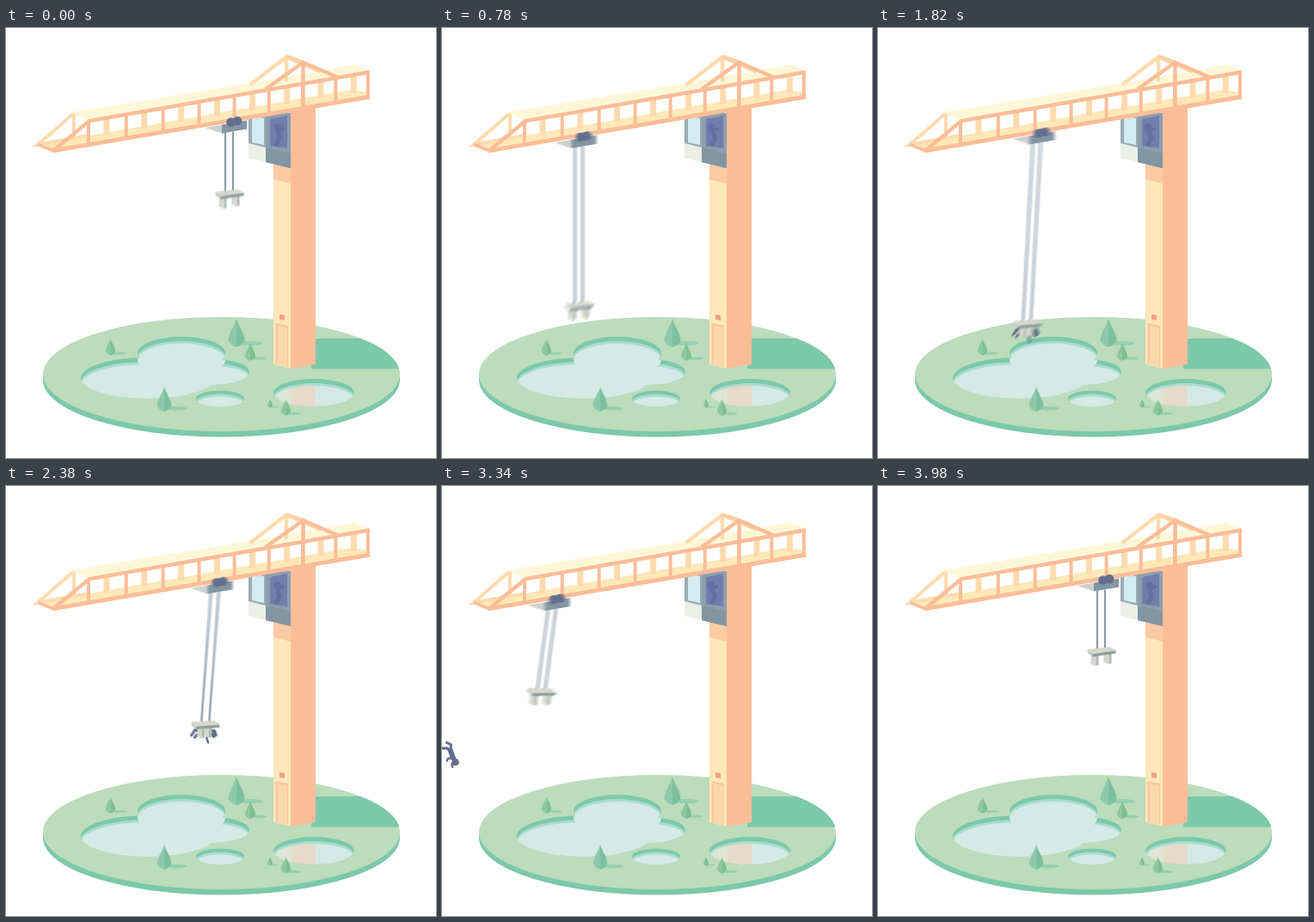
An HTML page with a canvas that plays this animation: 500x500 px, repeating every 4.68 s.

```html
<!DOCTYPE html>
<html lang="en">
<head>
<meta charset="utf-8">
<title>Crane</title>
<style>
html, body { margin: 0; width: 100%; height: 100%; overflow: hidden; background: #fff; }
canvas { display: block; width: 500px; height: 500px; }
</style>
</head>
<body>
<canvas id="stage" width="500" height="500"></canvas>
<script>
const LOOP = 4680, STEP = 40, START = 300, END = 3980;
const GRAB = 1240, RELEASE = 3080, SHUTTER = 20, SAMPLES = 6;
const ORANGE = '#fabd98', PEACH = '#fedbae', CREAM = '#fee8b9', TOP = '#fef7d7';
const GREEN = '#bcdcbb', TEAL = '#7cc8aa', WATER = '#d4eae5', SHORE = '#a9dccf';
const SLATE = '#8295a3', NAVY = '#63708d', STEEL = '#d6d8ce', SHADE = '#b3bab5';

const stage = document.getElementById('stage').getContext('2d');
const layer = () => Object.assign(document.createElement('canvas'), { width: 500, height: 500 }).getContext('2d');
const base = layer(), buffer = layer();
let g = base;

function trace(p) {
  g.beginPath();
  for (let i = 0; i < p.length; i += 2) g.lineTo(p[i], p[i + 1]);
}
function poly(color, ...p) {
  trace(p);
  g.fillStyle = color;
  g.fill();
}
function line(color, width, ...p) {
  trace(p);
  g.strokeStyle = color;
  g.lineWidth = width;
  g.stroke();
}
// Upright face below a slanted top edge.
const wall = (color, x1, y1, x2, y2, h) => poly(color, x1, y1, x2, y2, x2, y2 + h, x1, y1 + h);

function blobs(color, list, dy = 0) {
  g.beginPath();
  for (const [x, y, rx, ry] of list) {
    g.moveTo(x + rx, y + dy);
    g.ellipse(x, y + dy, rx, ry, 0, 0, 7);
  }
  g.fillStyle = color;
  g.fill();
}
const dot = (color, x, y, r) => blobs(color, [[x, y, r, r]]);

function placed(x, y, angle, draw) {
  g.save();
  g.translate(x, y);
  g.rotate(angle);
  draw();
  g.restore();
}

function pond(depth, ...list) {
  g.save();
  blobs(TEAL, list);
  g.clip();
  blobs(SHORE, list, depth);
  blobs(WATER, list, depth + 3);
  g.restore();
}

function tree(x, bottom, h) {
  const r = h * .285, wide = bottom - h * .22;
  blobs('#95d0ae', [[x + r * 1.7, bottom - h * .13, r * 1.5, h * .08]]);
  for (const side of [-1, 1]) {
    g.beginPath();
    g.moveTo(x, bottom - h);
    g.bezierCurveTo(x + side * r * .3, bottom - h * .7, x + side * r, bottom - h * .5, x + side * r, wide);
    g.quadraticCurveTo(x + side * r * .8, bottom - 2, x, bottom);
    g.fillStyle = `hsl(${h > 25 ? 152 : 136}, 35%, ${side < 0 ? 67 : 62}%)`;
    g.fill();
  }
}

function drawGround() {
  const disc = [[250.5, 402.5, 207.5, 66.5]];
  blobs(TEAL, disc, 6.5);
  g.save();
  blobs(GREEN, disc);
  g.clip();
  wall(TEAL, 355, 361, 470, 361, 35.5);
  g.restore();

  pond(5, [204, 378, 51, 19], [165, 407, 78, 24], [241, 400, 42, 15]);
  pond(4, [249, 431, 28, 9.5]);
  const mirror = [358, 424, 47, 16];
  pond(5, mirror);
  g.save();
  blobs('transparent', [mirror]);
  g.clip();
  blobs('transparent', [mirror], 8);
  g.clip();
  wall('#dfe6d6', 316, 405, 332, 405, 40);
  wall('#e8dac9', 332, 405, 360, 405, 40);
  g.restore();

  tree(268, 371, 33);
  tree(121.5, 381, 20);
  tree(284, 387, 21);
  tree(184, 446, 29);
  tree(307, 442, 11);
  tree(325.5, 451, 20);
}

function drawMast() {
  wall(CREAM, 311, 155, 331.5, 160, 236);
  wall('#fccba3', 311, 155, 331.5, 160, 21);
  wall('#fbc79f', 313.5, 343, 328, 346, 48);
  wall('#fdd8ac', 316, 346, 327, 348.5, 45);
  wall('#f2a088', 318, 333, 324, 334, 6);
  poly(ORANGE, 331, 85, 360, 85, 360, 391, 331, 396);
}

function drawCabin() {
  wall('#eceee8', 282, 103, 302, 108, 48);
  wall('#97adb8', 282, 98, 302, 103, 36);
  wall('#d3ebf3', 286, 102, 300, 105, 31);
  wall('#8c9fad', 302, 92, 331, 99, 64);
  wall(SLATE, 302, 139, 331, 146, 17);
  poly('#6f7eac', 307, 106, 327, 102, 327, 140, 307, 137);
}

function drawBeam() {
  const tip = [37, 135.5], backTop = [79, 99], backPeak = [326, 33.5], peak = [345.5, 40];
  const bottom = x => 143 - .1703 * (x - 56), top = x => 108 - .1785 * (x - 97);
  const posts = Array.from({ length: 9 }, (_, i) => 96 + 44.2 * i - .45 * i * i);
  const first = posts[0], last = 423;

  poly(CREAM, ...tip, 400, 72, last, 75, last, bottom(last), 56, 143);
  for (const x of posts.slice(0, -1)) line(PEACH, 7, x + 21, top(x + 21), x + 21, bottom(x + 21) - 8);
  line(PEACH, 4, ...backTop, ...tip, first, 125);
  line(PEACH, 4, ...backTop, backTop[0], 128);

  poly(TOP, 76, 98, 284, 64, 405, 42.5, last, 49.5, 97, 108);
  line(PEACH, 4.5, ...backPeak, backPeak[0], 62);
  line(PEACH, 4.5, 284, 66, ...backPeak, 366, 51);
  line('#fdd0a3', 5, ...backPeak, ...peak);

  line(ORANGE, 4, ...tip, 56, 143);
  line(ORANGE, 4.5, 55, 142.5, 97, 108, last, top(last) + 1.5);
  line(ORANGE, 5, 54, bottom(54) - .5, last, bottom(last) - .5);
  for (const x of posts) line(ORANGE, 4, x, top(x), x, bottom(x));
  line(ORANGE, 4.5, 302, 71, ...peak, 385, 57);
  line(ORANGE, 4.5, ...peak, peak[0], 93);
}

const linear = u => u;
const smooth = u => (1 - Math.cos(Math.PI * u)) / 2;

// Eases between [time, value] turning points and holds at both ends.
function track(ease, ...keys) {
  return t => {
    const next = keys.findIndex(k => k[0] > t);
    if (next < 1) return keys.at(next)[1];
    const [t0, a] = keys[next - 1], [t1, b] = keys[next];
    return a + (b - a) * ease((t - t0) / (t1 - t0));
  };
}
const trolleyAt = track(smooth, [260, 265], [1000, 139], [1520, 145], [2230, 264], [2970, 105], [3100, 106], [END, 265]);
const ropeAt = track(linear, [260, 69.5], [1160, 266], [1250, 266], [2700, 120], [END, 69.5]);
const swingAt = track(smooth, [1500, 0], [2240, -.14], [2780, .28], [3160, -.15], [END, 0]);

function pose(t) {
  const x = trolleyAt(t), y = 108.5 + (265 - x) * .172, swing = swingAt(t), rope = ropeAt(t);
  return { x, y, swing, cx: x - 5.5 + rope * Math.sin(swing), cy: y + 13 + rope * Math.cos(swing) };
}

function drawOperator(trolley) {
  const x = 316 + (trolley - 265) * .025, color = '#6371a0';
  dot(color, x, 115, 4);
  line(color, 5, x, 119, 318, 129, 313, 137);
  line(color, 3, x, 121, x + 8, 116);
}

function drawPerson(t) {
  const kick = Math.sin(t / 90) * 2;
  g.lineCap = g.lineJoin = 'round';
  line(NAVY, 6, 5, 0, -5, 0);
  line(NAVY, 3, -5, 0, -11, -3, -15, 2 + kick);
  line(NAVY, 3, -5, 1, -9, 3, -11, 8 - kick);
  line(NAVY, 2.5, 4, 1, 3, 6, 5, 9 + kick);
  line(NAVY, 2.5, 6, -1, 11, 4, 14, 3 - kick);
  dot(NAVY, 10, -1, 4);
  g.lineCap = 'butt';
  g.lineJoin = 'miter';
}

function drawClaw(closed) {
  const gap = closed ? 4 : 7.5;
  for (const x of [-gap, gap]) {
    const y = 4 - x * .15;
    wall(STEEL, x - 4.5, y - 2, x + 1.5, y, 13);
    wall(SHADE, x + 1.5, y, x + 4.5, y - 1, 13);
  }
  wall('#c5cac2', -16, -1, -10, 4, 3.5);
  wall('#8f9ca0', -10, 4, 17, 0, 3.5);
  poly(STEEL, -16, -1, 10, -4, 17, 0, -10, 4);
}

function drawRig(t) {
  const { x, y, swing, cx, cy } = pose(t), held = t >= GRAB && t < RELEASE;
  drawOperator(x);

  poly('#cbd0cc', x - 33, y + 7.5, x - 14, y + 4, x - 14, y + 14);
  wall(SLATE, x - 14, y + 4, x + 15, y - 1, 10);
  dot(NAVY, x - 3.5, y + 1, 5.3);
  dot(NAVY, x + 4, y - .5, 5.3);

  for (const side of [-4.5, 4.5]) {
    line('#8c9ba6', 2.2, x - 5.5 + side, y + 12,
      cx + side * Math.cos(swing), cy - side * Math.sin(swing) - 1);
  }
  placed(cx, cy, -swing, () => {
    if (held) placed(0, 11, 0, () => drawPerson(t));
    drawClaw(held);
  });
}

function drawFlight(t) {
  const d = t - RELEASE;
  if (d < 0 || d > 400) return;
  const { cx, cy } = pose(RELEASE);
  placed(cx - .3 * d, cy + 11 + .08 * d + .0004 * d * d, d * .0047, () => drawPerson(t));
}

drawGround();
drawMast();
drawCabin();
drawBeam();

function render() {
  const now = performance.now() % LOOP;
  const t = now < START ? START - STEP : Math.min(now - (now - START) % STEP, END);
  g = buffer;
  // Averaging a few instants gives the motion blur.
  for (let i = 0; i < SAMPLES; i++) {
    g.fillStyle = '#fff';
    g.fillRect(0, 0, 500, 500);
    g.drawImage(base.canvas, 0, 0);
    drawRig(t + SHUTTER * (i / (SAMPLES - 1) - .5));
    stage.globalAlpha = 1 / (i + 1);
    stage.drawImage(buffer.canvas, 0, 0);
  }
  stage.globalAlpha = 1;
  g = stage;
  drawFlight(t);
  requestAnimationFrame(render);
}
render();
</script>
</body>
</html>
```
